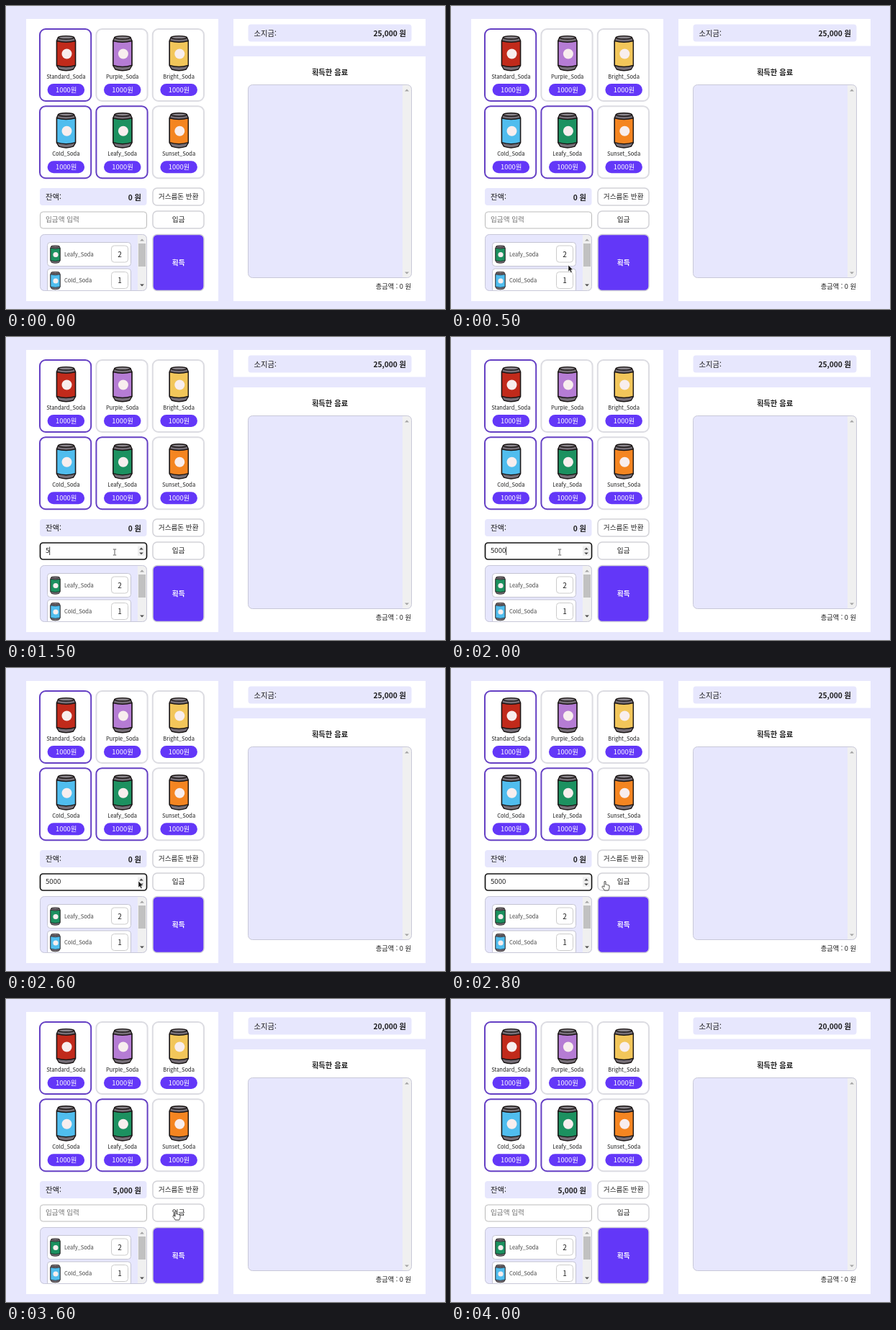
An HTML page for the animation above (4.3 s loop, 610x421 px).

```html
<!DOCTYPE html>
<html lang="ko">
<head>
<meta charset="utf-8">
<style>
  html, body { margin: 0; width: 100%; height: 100%; overflow: hidden; background: #e7e7fd; }
  svg { display: block; width: 610px; height: 421px; }
  text { font-family: "Noto Sans CJK KR", "Noto Sans CJK", "Noto Sans", sans-serif; fill: #1c1c1c; white-space: pre; }
</style>
</head>
<body>
<svg id="stage" viewBox="0 0 610 421" xmlns="http://www.w3.org/2000/svg"></svg>
<script>
const LOOP = 4300;
const PURPLE = '#6337f8', LILAC = '#e7e7fd';

const rect = (x, y, w, h, fill, r = 0, stroke = 'none', sw = 1, extra = '') =>
  `<rect x="${x}" y="${y}" width="${w}" height="${h}" rx="${r}" fill="${fill}" stroke="${stroke}" stroke-width="${sw}" ${extra}/>`;

const text = (x, y, s, size, { anchor = 'start', weight = 400, fill = '#1c1c1c', id = '' } = {}) =>
  `<text ${id && `id="${id}"`} x="${x}" y="${y}" font-size="${size}" text-anchor="${anchor}" font-weight="${weight}" style="fill:${fill}">${s}</text>`;

const triangle = (x, y, dir, fill, r = 3) =>
  `<path d="M${x - r} ${y + dir * r / 2}h${2 * r}l${-r} ${-dir * r}z" fill="${fill}"/>`;

// Can centred on x, with its top edge at y
const can = (x, y, color, scale = 1) => `
  <g transform="translate(${x} ${y}) scale(${scale})" stroke="#1a1515" stroke-width="1.4" stroke-linejoin="round">
    <path d="M-11 2.5L-13 7V42L-10 47Q0 50.5 10 47L13 42V7L11 2.5Z" fill="#777078"/>
    <path d="M-13 7.5Q0 11 13 7.5V41.5Q0 45.5-13 41.5Z" fill="${color}"/>
    <ellipse cy="2.8" rx="11" ry="2.2" fill="#8b868c"/>
    <circle cx="1" cy="25.5" r="7" fill="#f8eeee" stroke="none"/>
  </g>`;

const sodas = [
  ['Standard_Soda', '#c12a1b', true],
  ['Purple_Soda', '#b57cd4', false],
  ['Bright_Soda', '#f2c65a', false],
  ['Cold_Soda', '#50bdee', true],
  ['Leafy_Soda', '#1c9160', true],
  ['Sunset_Soda', '#f48521', false],
];

function card([name, color, selected], i) {
  const x = 47 + 78.4 * (i % 3), y = 32 + 107.2 * Math.floor(i / 3), mid = x + 36.3;
  return rect(x, y, 71.2, 100, '#fff', 8, selected ? '#6540c4' : '#dcdce2', 2) +
    can(mid + .2, y + 9, color) +
    text(mid, y + 69, name, 7.5, { anchor: 'middle' }) +
    rect(mid - 25.7, y + 76, 51.5, 17, PURPLE, 8.5) +
    text(mid + .4, y + 88.2, '1000원', 9.4, { anchor: 'middle', weight: 500, fill: '#fff' });
}

function cartItem([name, color], count, y) {
  return rect(57.5, y, 116, 33, '#fff', 4, '#c4c4d2') +
    can(68.5, y + 4, color, .51) +
    text(81, y + 19, name, 7.5, { fill: '#444' }) +
    rect(146.5, y + 4.5, 23, 23, '#fff', 4, '#ccc') +
    text(158, y + 20, count, 10, { anchor: 'middle', weight: 500 });
}

const button = (y, h, label, fill = '#fff', ink = '#1c1c1c', weight = 500) =>
  rect(204, y, 71, h, fill, 6, '#d2d2d8', 1.5) +
  text(239.7, y + h / 2 + 3.4, label, 9.6, { anchor: 'middle', weight, fill: ink });

const amount = (x, y, w, label, id) =>
  rect(x, y, w, 24, LILAC, 4) +
  text(x + 8, y + 16.3, label, 10.3, { weight: 500 }) +
  text(x + w - 7.5, y + 16.5, '', 10.2, { anchor: 'end', weight: 700, id });

const panels = rect(28, 18, 267, 392, '#fff') + rect(316, 18, 267, 37.5, '#fff') + rect(316, 70, 267, 340, '#fff');

const controls =
  amount(47, 253, 148.5, '잔액:', 'balance') +
  button(253, 24, '거스름돈 반환') +
  rect(47.5, 286, 148, 23, '#fff', 4, '#bbb', 1, 'id="field"') +
  text(55, 300.4, '', 9.6, { id: 'entry' }) +
  rect(55, 291.5, .8, 11.5, '#111', 0, 'none', 0, 'id="caret"') +
  `<g id="spinner">${rect(183, 290.5, 10, 13.5, '#efefef')}${triangle(188, 294, 1, '#444', 2.8)}${triangle(188, 300.8, -1, '#444', 2.8)}</g>` +
  button(285, 24, '입금') +
  button(317.5, 78, '획득', PURPLE, '#fff', 700);

const cart = `
  <clipPath id="cartClip">${rect(47, 317, 149, 79, '#fff', 6)}</clipPath>
  <g clip-path="url(#cartClip)">
    ${rect(47, 317, 149, 79, LILAC)}
    ${cartItem(sodas[4], 2, 328.5)}${cartItem(sodas[3], 1, 365)}
    ${rect(183, 317, 13, 79, '#f0f0f0')}${rect(184, 330, 10, 32, '#c1c1c1')}
    ${triangle(189, 325, 1, '#a3a3a3')}${triangle(189, 388, -1, '#505050')}
  </g>
  ${rect(47.5, 317.5, 148, 78, 'none', 6, '#c8c8d8')}`;

const results =
  amount(336.5, 25.5, 227, '소지금:', 'wallet') +
  text(450, 96, '획득한 음료', 10.3, { anchor: 'middle', weight: 700 }) +
  rect(336.5, 109.5, 227, 268, LILAC, 6) +
  '<path d="M551 109.5h6.5q6 0 6 6v256q0 6-6 6h-6.5z" fill="#f0f0f0"/>' +
  triangle(557, 117, 1, '#a3a3a3') + triangle(557, 371, -1, '#a3a3a3') +
  rect(336.5, 109.5, 227, 268, 'none', 6, '#c8c8d8') +
  text(563, 393, '총금액 : 0 원', 9.2, { anchor: 'end', weight: 500 });

const cursors = `<g id="cursor">
  <path id="arrow" d="M0 0V9L2 7.2L3.5 10.5L5.1 9.8L3.7 6.6H6.4Z" fill="#111" stroke="#fff" stroke-width=".5"/>
  <path id="beam" d="M-2.2-4H-.5L0-3.6L.5-4H2.2M0-3.6V3.6M-2.2 4H-.5L0 3.6L.5 4H2.2" fill="none" stroke="#333" stroke-width=".8"/>
  <path id="hand" d="M-1 7V1Q0-.8 1 1V5Q2.2 4 2.7 5.3Q4 4.6 4.4 5.8Q6 5.3 6 7V9.5Q5.6 11.2 4.7 13H-.8Q-2 10.6-4 8.5Q-4.2 6.3-2.3 7.3L-1 8.3Z" fill="#fff" stroke="#222" stroke-width=".8"/>
</g>`;

const $ = id => document.getElementById(id);
$('stage').innerHTML = panels + sodas.map(card).join('') + controls + cart + results + cursors;

// [time, x, y, shape]; each position holds until the next
const path = [
  [0], [300, 172, 415, 'arrow'], [400, 168, 392, 'arrow'], [500, 163, 360, 'arrow'],
  [600, 157, 328, 'arrow'], [700, 151, 299, 'beam'],
  [2600, 184, 296, 'arrow'], [2700, 200, 297, 'arrow'], [2800, 214, 296, 'hand'],
  [2900, 225, 295, 'hand'], [3000, 228, 294, 'hand'], [3600, 236, 294, 'hand'],
  [3700, 243, 318, 'hand'], [3800, 262, 352, 'hand'], [3900, 285, 395, 'arrow'], [4000],
];
const keyTimes = [1500, 1600, 1800, 2000];
const show = (id, on) => $(id).setAttribute('visibility', on ? 'visible' : 'hidden');

function draw(t) {
  const paid = t >= 3000, focused = t >= 800 && !paid;
  const digits = paid ? 0 : keyTimes.filter(k => t >= k).length;
  const entry = $('entry'), field = $('field');

  $('balance').textContent = paid ? '5,000 원' : '0 원';
  $('wallet').textContent = paid ? '20,000 원' : '25,000 원';
  entry.textContent = digits ? '5000'.slice(0, digits) : '입금액 입력';
  entry.style.fill = digits ? '#222' : '#757575';
  field.setAttribute('stroke', focused ? '#151515' : '#bbb');
  field.setAttribute('stroke-width', focused ? 1.7 : 1);
  show('spinner', t >= 700 && !paid);
  show('caret', focused && (t < 1300 || t >= 1500) && t < 2600);
  $('caret').setAttribute('x', 55 + digits * 5.33);

  const [, x, y, shape] = path.findLast(p => t >= p[0]);
  for (const id of ['arrow', 'beam', 'hand']) show(id, id === shape);
  if (shape) $('cursor').setAttribute('transform', `translate(${x} ${y})`);
}

const start = performance.now();
function tick() {
  draw((performance.now() - start) % LOOP);
  requestAnimationFrame(tick);
}
tick();
</script>
</body>
</html>
```
